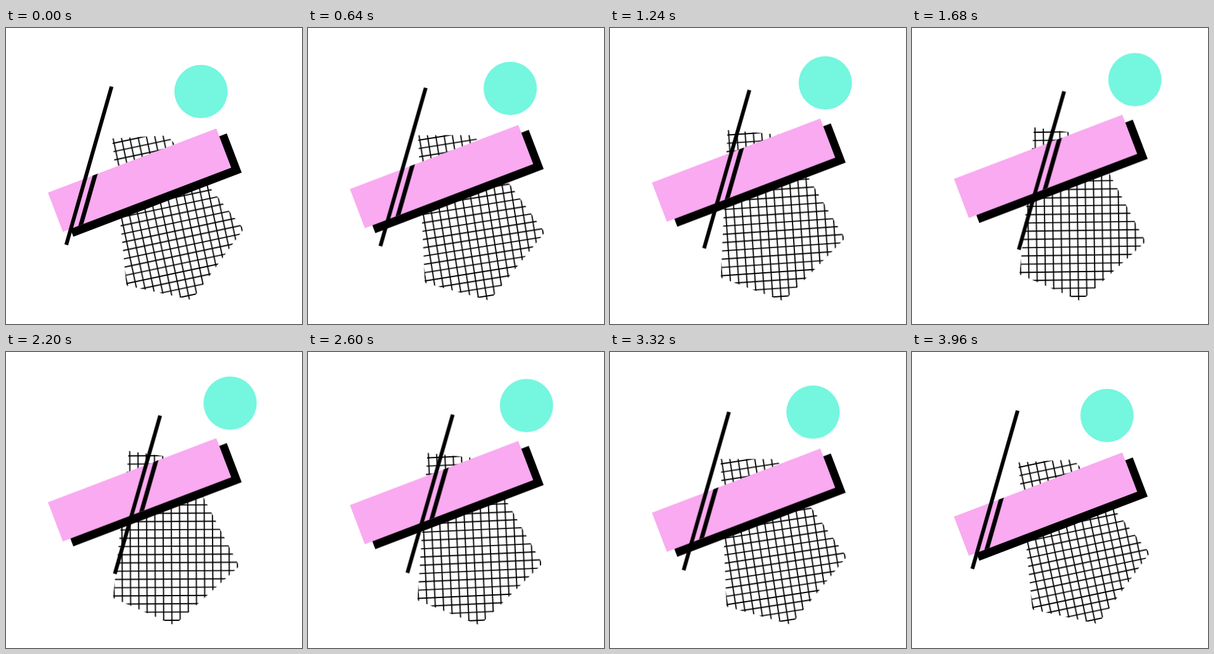
Animation, 480 px wide and 480 px high, one loop 4 s. Source, as an HTML page:

```html
<!DOCTYPE html>
<html lang="en">
<head>
<meta charset="utf-8">
<title>Geometric shapes</title>
<style>
  html, body { margin: 0; width: 100%; height: 100%; overflow: hidden; background: #fff; }
  svg { display: block; width: 100%; height: 100%; }

  .move {
    animation: slide 2s cubic-bezier(.3333, 0, .6667, 1) infinite alternate;
  }
  .circle { --to: translate(48.6px, -20.7px); }
  .bar    { --to: translate(0, -24px); }
  .line   { --to: translate(81px, 8.3px); }
  .stripe { --to: translate(81px, 32.3px); } /* line motion relative to the bar */
  .mesh   { --from: rotate(-12deg); --to: rotate(0deg); transform-origin: 277px 302px; }

  @keyframes slide {
    from { transform: var(--from, translate(0, 0)); }
    to   { transform: var(--to); }
  }
</style>
</head>
<body>
<svg viewBox="0 0 480 480">
  <defs>
    <clipPath id="pentagon"><path d="M200 160 289 174 378 348 272 443 173 398Z"/></clipPath>
    <path id="slab" d="M68 267 341 163 365.2 226.5 92.2 330.5Z"/>
    <clipPath id="slabClip"><use href="#slab"/></clipPath>
  </defs>

  <!-- each wide dashed stroke draws one set of parallel grid lines -->
  <g class="move mesh">
    <g clip-path="url(#pentagon)" stroke="#000" stroke-dasharray="1.9 11.45">
      <path d="M280 153.7V450" stroke-width="240"/>
      <path d="M160.5 302H390" stroke-width="320"/>
    </g>
  </g>

  <circle class="move circle" cx="316.2" cy="103" r="43.2" fill="#74f6df"/>

  <g class="move bar">
    <use href="#slab" x="17" y="8"/>
    <use href="#slab" fill="#f9aaf0"/>
    <g clip-path="url(#slabClip)">
      <path class="move stripe" d="M185.6 95 112.1 351.7" stroke="#000" stroke-width="7"/>
    </g>
  </g>

  <path class="move line" d="M171.2 95 97.7 351.7" stroke="#000" stroke-width="6.2"/>
</svg>
</body>
</html>
```
